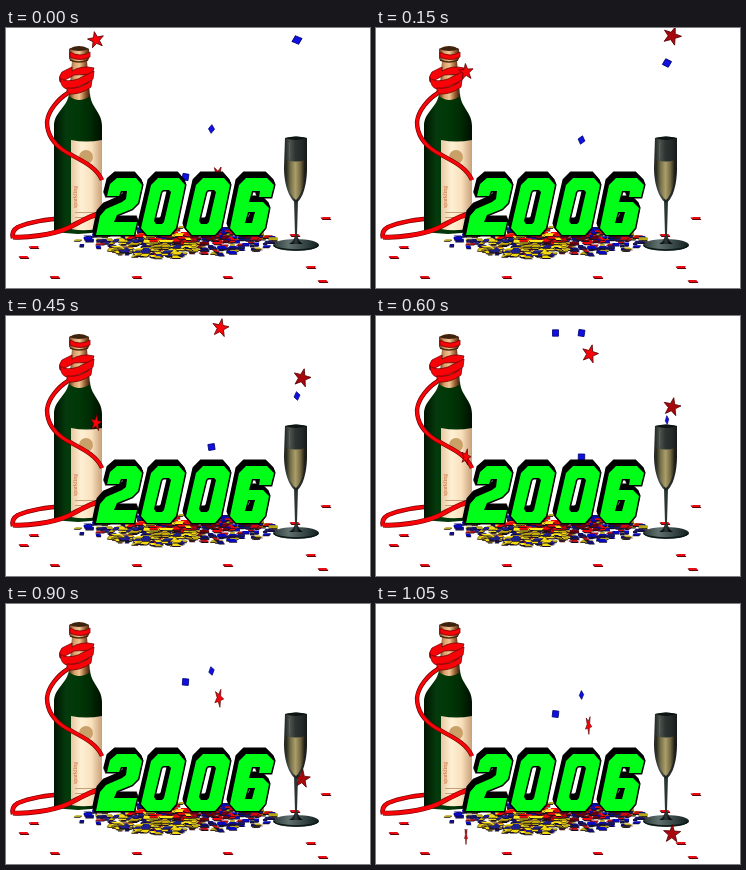
An HTML page with a canvas that plays this animation: 364 px wide and 260 px high, repeating every 1200 ms.

```html
<!DOCTYPE html>
<html lang="en">
<head>
<meta charset="utf-8">
<title>2006</title>
<style>
  html, body { margin: 0; width: 100%; height: 100%; overflow: hidden; background: #fff; }
  canvas { display: block; width: 364px; height: 260px; }
</style>
</head>
<body>
<canvas id="stage" width="364" height="260"></canvas>
<script>
const ctx = document.getElementById('stage').getContext('2d');
const STEP = 150, STEPS = 8;
const RED = '#f80408', DARK_RED = '#a8080c', BLUE = '#0808c8', GREEN = '#00ff18';

function fill(path, color) {
  ctx.fillStyle = color;
  ctx.fill(new Path2D(path), 'evenodd');
}

function stroke(path, color, width) {
  ctx.strokeStyle = color;
  ctx.lineWidth = width;
  ctx.stroke(new Path2D(path));
}

function shade(x0, x1, ...colors) {
  const g = ctx.createLinearGradient(x0, 0, x1, 0);
  colors.forEach((c, i) => g.addColorStop(i / (colors.length - 1), c));
  return g;
}

function seeded(seed) {
  return () => (seed = (seed * 16807) % 2147483647) / 2147483647;
}

// Falling pieces: first visible step, then the height at each following step.
const pieces = [
  { star: true, x: 90, start: 0, ys: [12, 44, 76, 107, 141, 172, 204, 232],
    widths: [1, .9, .65, .7, .6, .1, .2, .18], angle: -.2, spin: .12, color: RED, r: 8.5 },
  { star: true, x: 296, start: 1, ys: [8, 36, 62, 91, 121, 175, 230],
    widths: [1, 1, .95, .95, .9, .9, .95], angle: .35, spin: -.05, color: DARK_RED, r: 9.5 },
  { star: true, x: 215, start: 2, ys: [-6, 12, 38, 66, 94, 121, 147],
    widths: [1, .9, .9, .75, .5, .35, .6], angle: .1, spin: .08, drift: -.5, color: RED, r: 9.5 },
  { x: 205.5, start: 4, ys: [17, 42, 67, 91, 101, 112, 122, 131, 141],
    widths: [1, .9, .65, .5, .7, .8, .9, 1, 1], angle: .15, spin: .18 },
  { x: 179.5, start: 4, ys: [17, 46, 78, 110, 149],
    widths: [1, 1, 1, 1, 1], angle: 0, spin: .04 },
  { x: 291, start: 0, ys: [12, 35, 58, 80, 104, 127],
    widths: [1.2, 1.1, 1, .7, .4, .3], angle: .45, spin: .04 }
];

function drawPiece(p, i) {
  ctx.save();
  ctx.translate(p.x + (p.drift || 0) * i, p.ys[i]);
  ctx.scale(p.widths[i], 1);
  ctx.rotate(p.angle + p.spin * i);
  ctx.beginPath();
  if (p.star) {
    for (let k = 0; k < 10; k++) {
      const a = k * Math.PI / 5 - Math.PI / 2, r = k % 2 ? p.r * .4 : p.r;
      ctx.lineTo(r * Math.cos(a), r * Math.sin(a));
    }
  } else {
    ctx.rect(-3, -3.2, 6, 6.4);
  }
  ctx.closePath();
  ctx.fillStyle = p.color || '#1010e0';
  ctx.fill();
  ctx.strokeStyle = p.star ? '#580004' : '#000078';
  ctx.lineWidth = .8;
  ctx.stroke();
  ctx.restore();
}

function drawFalling(step, front) {
  for (const p of pieces) {
    for (let i = (step - p.start + STEPS) % STEPS; i < p.ys.length; i += STEPS) {
      if ((p.ys[i] > 215) === front) drawPiece(p, i);
    }
  }
}

function flake(x, y, w, h, slant, color) {
  fill(`M${x - w / 2 + slant} ${y - h / 2}h${w}l${-slant * 2} ${h}h${-w}z`, color);
}

function drawFloor() {
  const spots = [[18, 229], [28, 219], [49, 249], [131, 249], [222, 249],
    [305, 239], [317, 253], [320, 190], [289, 207]];
  spots.forEach(([x, y], i) => {
    flake(x, y + .8, 9, 2.4, -1, '#600008');
    flake(x, y, 8, 2, i % 2 ? 1 : -1, '#e80c12');
  });
}

function drawBottle() {
  fill('M48 203V98C48 84 61 80 63 66H84C85 80 96 84 96 98V203Q72 209 48 203Z',
    shade(48, 96, '#001400', '#043a0c', '#003808', '#002c04', '#001000'));
  fill('M63 21Q73 15 83 21V31L81 33L84 68Q73 76 63 68L66 33L63 31Z',
    shade(63, 84, '#5c3418', '#d8a06a', '#f0c490', '#9a6236', '#3c1c0c'));
  fill('M63 21Q73 15 83 21Q73 25 63 21Z', '#3e2210');
  stroke('M64 32Q73 36 82 32', '#4c2810', 1.5);
  fill('M65 112Q80 115 96 112V200Q80 204 65 201Z',
    shade(65, 96, '#e8c8a0', '#fff0d4', '#f8e0bc', '#c8a078'));
  fill('M73 129a7 7 0 1 0 14 0a7 7 0 1 0-14 0', '#c8a068');
  ctx.save();
  ctx.translate(71, 180);
  ctx.rotate(-Math.PI / 2);
  ctx.font = '6px "Liberation Serif", serif';
  ctx.fillStyle = '#c86838';
  ctx.fillText('sparkling', 0, 0);
  ctx.restore();
  fill('M69 184h24v1h-24zM69 189h24v1h-24z', '#c8a078');
}

function ribbon(path, width) {
  stroke(path, '#780004', width + .6);
  stroke(path, RED, width - .8);
}

function band(path) {
  fill(path, RED);
  stroke(path, '#780004', .8);
}

function drawBackRibbon() {
  ribbon('M60 190C42 191 24 194 12 199Q5 203 7 210', 4);
}

function drawFrontRibbon() {
  band('M64 24Q74 30 84 24V29Q74 34 64 29Z');
  band('M66 39L56 44Q52 49 54 54Q60 52 68 47L86 46L88 40Q76 37 66 43Z');
  band('M54 50Q60 55 72 51L88 43L87 51Q74 60 61 61Q55 60 54 50Z');
  band('M61 60Q74 62 86 52L85 59Q75 67 61 66Z');
  ribbon('M62 65C52 71 42 83 41 94C41 107 47 116 60 124C74 132 90 138 96 152', 3.8);
  ribbon('M7 209C20 210 46 207 62 200C76 193 84 187 101 184', 4.5);
}

function drawGlass() {
  fill('M267 217a23 6 0 1 0 46 0a23 6 0 1 0-46 0', shade(267, 313, '#283838', '#60706c', '#384848', '#101c1c'));
  stroke('M268 217a22 5 0 0 0 44 0', '#0c1818', 1.4);
  fill('M288 170H292L291 207Q293 214 297 216H283Q288 214 289 207Z',
    shade(286, 294, '#081010', '#303c3a', '#040808'));
  ctx.globalAlpha = .93;
  fill('M279 110Q290 107 301 110V140C301 156 297 171 290 175C283 171 278 156 278 140Z',
    shade(278, 301, '#080e0e', '#404840', '#1c2422', '#141a1a', '#040808'));
  fill('M280 132Q290 135 299 132V142C299 156 295 168 290 172C284 168 280 156 280 142Z',
    shade(280, 299, '#242414', '#7c744c', '#b4a66c', '#7c7048', '#181810'));
  ctx.globalAlpha = 1;
  fill('M279 110Q290 107 301 110Q290 114 279 110Z', '#0c1414');
  stroke('M283.5 115V131', '#586058', 1.2);
}

function drawHeap() {
  const rnd = seeded(2006);
  const scatter = (count, cx, cy, rx, ry, colors) => {
    for (let i = 0; i < count; i++) {
      const a = rnd() * Math.PI * 2, r = Math.sqrt(rnd());
      const x = cx + rx * r * Math.cos(a), y = cy + ry * r * Math.sin(a);
      const w = 4 + rnd() * 5, h = 1.5 + rnd() * 1.5, slant = rnd() * 4 - 2;
      flake(x, y + .9, w, h, slant, '#181020');
      flake(x, y, w, h, slant, colors[Math.floor(rnd() * colors.length)]);
    }
  };
  scatter(250, 172, 213, 101, 15, [BLUE, '#101080', '#c01014', '#181868', '#b8a818']);
  scatter(150, 149, 217, 47, 13, ['#ffe81c', '#f4d810', '#c8ac08', '#f4d810', '#202090']);
  scatter(100, 200, 208, 52, 8, [RED, '#d00c12', '#700008', BLUE]);
  scatter(45, 157, 208, 34, 7, ['#ffe81c', RED, RED]);
}

const zero = 'M145 157L152 150H173L179 157L170 200L164 207H141L135 200Z' +
  'M157 162L155 164L148 193L150 196H156L158 194L165 164L163 162Z';
const two = 'M101 168L104 156L111 150H130L136 157L132 175L126 181L111 187L108 194H131L128 207H90L94 188L100 181L116 174L120 171L121 163H115L113 168Z';
const six = 'M233 157L240 150H261L268 157L265 169H253L254 163H246L243 174H257L263 180L259 200L253 207H230L224 200Z' +
  'M242 184L239 195H246L249 184Z';
const digits = [[two, 0], [zero, 0], [zero, 45], [six, 0]];

function drawYear() {
  const each = paint => digits.forEach(([path, dx]) => {
    ctx.save();
    ctx.translate(dx, 0);
    paint(path);
    ctx.restore();
  });
  each(path => {
    for (let d = 0; d <= 5; d++) {
      ctx.save();
      ctx.translate(-d * .4, -d);
      fill(path, '#000');
      stroke(path, '#000', 3);
      ctx.restore();
    }
  });
  each(path => fill(path, GREEN));
}

function draw(step) {
  ctx.fillStyle = '#fff';
  ctx.fillRect(0, 0, 364, 260);
  drawFloor();
  drawBackRibbon();
  drawBottle();
  drawFrontRibbon();
  drawFalling(step, false);
  drawGlass();
  drawHeap();
  drawYear();
  drawFalling(step, true);
}

const begin = performance.now();
let shown = -1;
function tick() {
  const step = Math.floor((performance.now() - begin) / STEP) % STEPS;
  if (step !== shown) draw(shown = step);
  requestAnimationFrame(tick);
}
tick();
</script>
</body>
</html>
```
